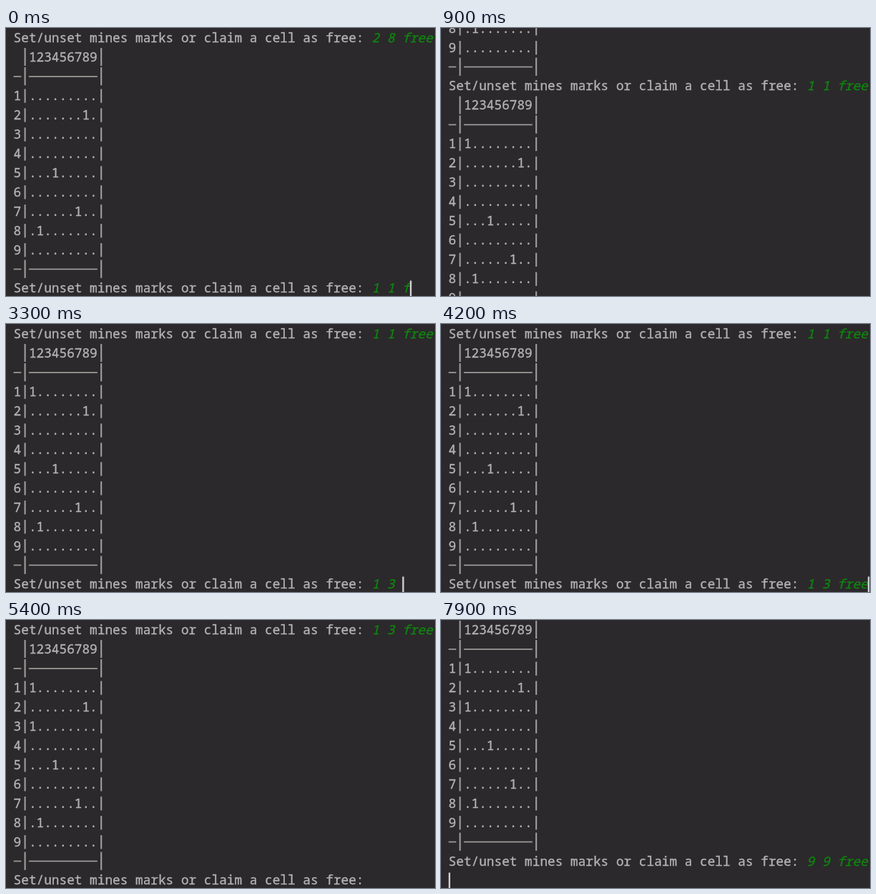
Write an HTML page that moves like this. It is 600 px wide and 375 px high and loops after 8 s.

```html
<!DOCTYPE html>
<html lang="en">
<head>
<meta charset="utf-8">
<title>Minesweeper console</title>
<style>
  html, body { margin: 0; width: 100%; height: 100%; overflow: hidden; background: #2b292b; }
  svg { display: block; width: 600px; height: 375px; background: #2b292b; }
  text {
    font: 17.75px "Noto Sans Mono", "DejaVu Sans Mono", monospace;
    fill: #b4b4b4; stroke: #b4b4b4; stroke-width: .35px; white-space: pre;
  }
  .input { font-style: italic; fill: #0f860f; stroke: #0f860f; }
  .bar { fill: #a09e9c; }
  .caret { fill: #cfcfcf; }
</style>
</head>
<body>
<svg viewBox="0 0 600 375"><g id="doc"></g></svg>
<script>
const LOOP = 8000, STEP = 100;
const X0 = 10.6, CHAR = 10.66, LINE = 26.96, BASE = 20;
const ROUND = 13;                       // lines per prompt plus board
const PROMPT = 'Set/unset mines marks or claim a cell as free: ';
const doc = document.getElementById('doc');

// Each round: typed text, [time, typed length] steps, time of Enter
const rounds = [
  { text: '1 1 free', keys: [[0, 5], [100, 6], [300, 7], [500, 8]], enter: 700 },
  { text: '1 3 free', keys: [[2600, 1], [2800, 2], [3000, 3], [3200, 4], [3500, 5], [3700, 6], [4000, 7], [4200, 8]], enter: 4400 },
  { text: '9 9 free', keys: [[6600, 1], [6800, 2], [6900, 3], [7100, 4], [7200, 5], [7400, 6], [7600, 7], [7800, 8]], enter: 7900 }
];
const hidden = [[1400, 1800], [2400, 2600], [5400, 5800], [6400, 6600]];
// Scroll distance by time since Enter
const glide = [[0, LINE], [100, 33], [200, 283], [300, ROUND * LINE]];

const col = n => X0 + n * CHAR;
const base = n => BASE + n * LINE;

function add(parent, tag, attrs, text) {
  const el = document.createElementNS('http://www.w3.org/2000/svg', tag);
  for (const k in attrs) el.setAttribute(k, attrs[k]);
  if (text) el.textContent = text;
  parent.append(el);
  return el;
}

const write = (g, line, c, text, cls = '') =>
  add(g, 'text', { x: col(c), y: base(line), class: cls }, text);

function bars(g, line, up, down) {
  const width = 2.1;
  for (const c of [1, 11])
    add(g, 'rect', { x: col(c + .5) - width / 2, y: base(line) - 6.5 - up, width, height: up + down, class: 'bar' });
}

function rule(g, line) {
  bars(g, line, 12.5, 12.8);
  for (const [c, n] of [[0, 1], [2, 9]])
    add(g, 'rect', { x: col(c), y: base(line) - 6.9, width: n * CHAR, height: 1.7, class: 'bar' });
}

function board(g, top, cells) {
  write(g, top, 2, '123456789');
  bars(g, top, 12.5, 12.5);
  rule(g, top + 1);
  for (let r = 1; r <= 9; r++) {
    const row = Array.from({ length: 9 }, (_, c) => cells.includes(r * 10 + c + 1) ? '1' : '.').join('');
    write(g, top + 1 + r, 0, String(r));
    write(g, top + 1 + r, 2, row);
    bars(g, top + 1 + r, 9, 10.3);
  }
  rule(g, top + 11);
}

// Open cells as row * 10 + column
const cells = [28, 54, 77, 82];
const opened = [[], [11], [11, 31]];

write(doc, 0, 0, PROMPT);
write(doc, 0, PROMPT.length, '2 8 free', 'input');
rounds.forEach((r, i) => {
  const line = (i + 1) * ROUND;
  r.group = add(doc, 'g', {});
  board(r.group, line - 12, cells.concat(opened[i]));
  write(r.group, line, 0, PROMPT);
  r.input = write(r.group, line, PROMPT.length, '', 'input');
});
const caret = add(doc, 'rect', { width: 2.4, height: 22, class: 'caret' });

function scrolled(dt) {
  if (dt < 0) return 0;
  for (let i = 1; i < glide.length; i++) {
    const [a, from] = glide[i - 1], [b, to] = glide[i];
    if (dt < b) return from + (to - from) * (dt - a) / (b - a);
  }
  return ROUND * LINE;
}

function draw(t) {
  let scroll = 0, line = 0, c = 0;
  rounds.forEach((r, i) => {
    const shown = i === 0 || t >= rounds[i - 1].enter + 100;
    const count = r.keys.reduce((n, [at, len]) => t >= at ? len : n, 0);
    r.group.style.display = shown ? '' : 'none';
    r.input.textContent = r.text.slice(0, count);
    scroll += scrolled(t - r.enter);
    if (!shown) return;
    const done = t >= r.enter;
    line = (i + 1) * ROUND + (done ? 1 : 0);
    c = done ? 0 : PROMPT.length + count;
  });
  doc.setAttribute('transform', `translate(0 ${-scroll})`);
  caret.setAttribute('x', col(c));
  caret.setAttribute('y', base(line) - 17);
  caret.style.display = hidden.some(([a, b]) => t >= a && t < b) ? 'none' : '';
}

const start = performance.now();
function tick() {
  const t = (performance.now() - start) % LOOP;
  draw(Math.floor(t / STEP) * STEP);
  requestAnimationFrame(tick);
}
tick();
</script>
</body>
</html>
```
